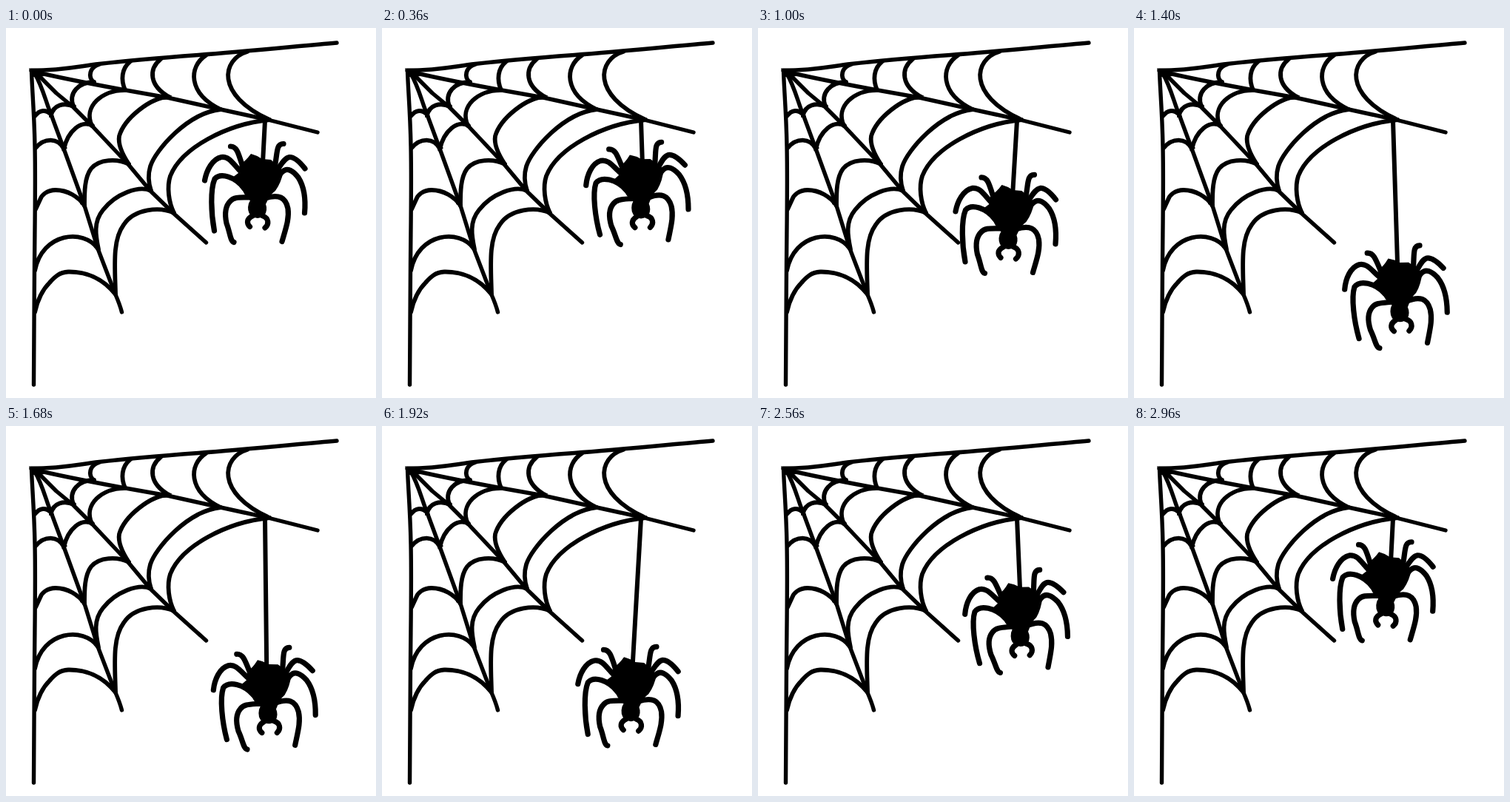
Write an HTML page that moves like this. It is 500 px wide and 500 px high and loops after 3 s.

```html
<!DOCTYPE html>
<html lang="en">
<head>
<meta charset="utf-8">
<title>Spider on a web</title>
<style>
  html, body { margin: 0; width: 100%; height: 100%; overflow: hidden; background: #fff; }
  svg { display: block; width: 100vw; height: 100vh; }
  .line { fill: none; stroke: #000; stroke-linecap: round; stroke-linejoin: round; }
</style>
</head>
<body>
<svg viewBox="0 0 500 500">
  <!-- spokes -->
  <g class="line" stroke-width="5.400">
    <path d="M34 57.500C80 57 96 52 126 48.500S200 41 260 36.500S390 25 447 20"/>
    <path d="M38 59C80 69 118 76 156 83L218 94L290 110L354 124L421 141"/>
    <path d="M39 59L68 88L91 107L116 132L165 184L195 220L227 251L270.500 290"/>
    <path d="M38 60C50 80 54 101 61 117L78 163L106 240L124 298L147 358Q154 374 156.500 384"/>
    <path d="M34.500 58C35 80 38 110 39 160S39 260 38.500 320S38 420 37.500 482"/>
  </g>
  <!-- rings, one row per sector -->
  <g class="line" stroke-width="5.800">
    <path d="M126 49C113 53 110 66 119 74M168 45C156 55 155 70 161 84M209 42C192 56 194 78 220 93M270 37C247 52 245 88 290 110M326 32C292 42 282 90 356 124"/>
    <path d="M119 73C98 73 84 88 91 106M160 84C130 84 104 106 116 132M220 93C195 94 160 122 153 146C151 158 158 172 166 184M290 110C245 115 202 165 195 187C192 197 192 208 196 220M356 124C298 130 237 162 222 200C217 215 220 236 227 250"/>
    <path d="M92 106C78 100 64 104 61 118M117 132C102 124 84 138 78 164M166 184C150 176 126 177 115 190C106 202 106 222 106 240M196 220C180 212 148 224 131 246C118 262 121 280 125 299M227 250C208 241 173 244 159 266C144 286 147 320 148 358"/>
    <path d="M61 117C54 110 46 110 39 119M78 163C70 148 52 148 40 162M106 240C98 228 83 219 67 219C55 219 48 226 46 232L40 245M124 298C105 271 49 276 39 328M148 360C130 337 106 329 84 329.500C72 330 65 337 59 344C51 352 43 366 39 384"/>
  </g>
  <!-- knots where rings meet spokes -->
  <path d="M31 54.500L48 55L52 65L45 66L36 66ZM61 110L65 120L58 121ZM114 122L121 134L111 132ZM160 174L171 188L154 181ZM193 212L200 222L190 221ZM221 241L232 254L219 249ZM206 90L224 91L222 96L211 97ZM276 106L293 109L284 113ZM342 118L361 124L343 128ZM103 231L109 242L100 238ZM145 346L152 366L143 355ZM121 289L128 302L119 296ZM38 235L45 239L40 247ZM76 156L83 162L77 168Z"/>
  <g id="swing">
    <line id="thread" class="line" x1="350" y1="125" stroke-width="6"/>
    <g id="slide">
      <g transform="rotate(-3 350 125)">
        <path d="M331 170Q339 172 346 177L358 178Q366 185 375 193Q372 209 364 220Q356 226 353 234L351 238Q354 246 349 254Q340 260 331 254Q325 247 328 237L330 233Q324 229 320 220Q313 209 306 202L314 196L316 184Q323 181 331 170Z"/>
        <g class="line" stroke-width="7.200">
          <path d="M303.500 160C312 160 314 169 320 188"/>
          <path d="M268.500 206C271 192 279 177 291 174.500C302 173 307 184 318 195"/>
          <path d="M281.500 274C277 250 276 218 282 204C290 195 310 201 322 217"/>
          <path d="M308 289.500C303 288 303 277 298 264C295 250 297 240 303 234C308 228 316 229 330 229"/>
          <path d="M375 156.500C365 156 367 168 363 189"/>
          <path d="M404 190C397 181 390 174 383 174.500C375 176 371 187 362 198"/>
          <path d="M403.500 250C405 233 404 216 395 202C388 193 380 188 374 194C369 198 364 207 358 212"/>
          <path d="M373 288.500C378 271 383 258 381 244C378 229 369 224 350 230"/>
          <path d="M333 254C325 258 325 264 329.500 268.500M347 254C355 257 356 265 350 270"/>
        </g>
      </g>
    </g>
  </g>
</svg>
<script>
  const LOOP = 3000, STEP = 40, SWING = 1000, TILT = 3, DROP = 145;
  const [swing, slide, thread] = ["swing", "slide", "thread"].map(id => document.getElementById(id));

  // cubic-bezier(.42, 0, .58, 1), solved by bisection
  function ease(p) {
    if (p <= 0) return 0;
    if (p >= 1) return 1;
    let lo = 0, hi = 1, s = p;
    for (let i = 0; i < 24; i++) {
      s = (lo + hi) / 2;
      const x = 3 * (1 - s) * s * (0.42 * (1 - s) + 0.58 * s) + s ** 3;
      if (x < p) lo = s; else hi = s;
    }
    return s * s * (3 - 2 * s);
  }

  const ramp = (t, from, to) => ease((t - from) / (to - from));

  function draw(now) {
    const t = Math.floor((now % LOOP) / STEP) * STEP;
    const angle = TILT * Math.cos(2 * Math.PI * t / SWING);
    const drop = DROP * (ramp(t, 700, 1505) - ramp(t, 1800, LOOP));
    swing.setAttribute("transform", `rotate(${angle} 350 125)`);
    slide.setAttribute("transform", `translate(${0.016 * drop} ${drop})`);
    thread.setAttribute("x2", 350 - 0.016 * drop);
    thread.setAttribute("y2", 186 + drop);
  }

  const start = performance.now();
  function tick() {
    draw(performance.now() - start);
    requestAnimationFrame(tick);
  }
  tick();
</script>
</body>
</html>
```
